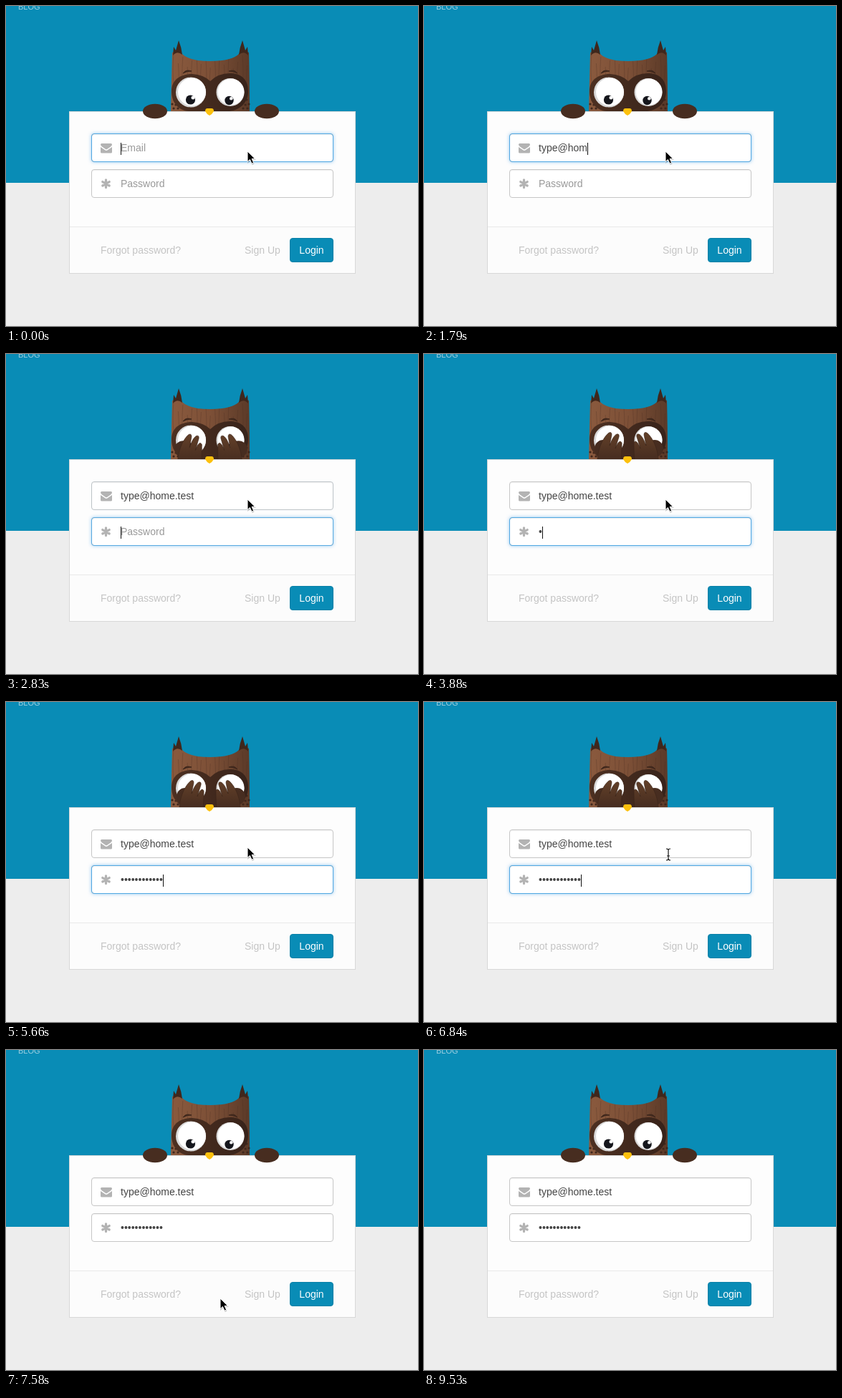
Animation of 575 by 447 pixels, one loop 9770 ms. Source, as an HTML page:

```html
<!DOCTYPE html>
<html lang="en">
<head>
<meta charset="utf-8">
<title>Owl login</title>
<style>
  html, body { margin: 0; width: 100%; height: 100%; overflow: hidden; background: #ededed; }
  body { position: relative; font: 14px/16px "Liberation Sans", Arial, sans-serif; color: #444; }
  div, span.at, svg { position: absolute; box-sizing: border-box; white-space: pre; }
  svg { left: 0; top: 0; }
  .sky { left: 0; top: 0; width: 575px; height: 247px; background: #098cb6; }
  .blog { left: 17px; top: -7px; font-size: 11px; color: #9fcfe0; }
  .card { left: 88px; top: 147px; width: 400px; height: 227px; background: #fdfdfd; border: 1px solid #d8d8d8; }
  .rule { left: 0; top: 160px; width: 398px; height: 65px; border-top: 1px solid #e9e9e9; background: #fcfcfc; }
  .field { left: 119px; width: 338px; height: 40px; padding: 11px 0 0 40px; border: 1px solid #c6c6c6;
    border-radius: 4px; background: #fff; box-shadow: inset 0 1px 1px rgba(0,0,0,.06); }
  .glow { inset: -1px; border: 1px solid #52a8e2; border-radius: 4px; box-shadow: 0 0 5px rgba(82,168,236,.6); }
  .caret { display: inline-block; width: 1px; height: 17px; margin: -2px -1px -2px 0; vertical-align: -3px; background: #111; }
  .hint { color: #999; }
  .link { color: #c4c4c4; }
  .btn { left: 396px; top: 324px; width: 61px; height: 34px; border: 1px solid #087fa6; border-radius: 4px;
    background: #098cb6; color: #fff; text-align: center; line-height: 32px; }
</style>
</head>
<body>
<div class="sky"></div>
<div class="blog">BLOG</div>
<div class="card"><div class="rule"></div></div>
<div class="field" id="mail" style="top:178px"><div class="glow"></div><span class="val"></span><i class="caret"></i><span class="hint">Email</span></div>
<div class="field" id="pass" style="top:228px"><div class="glow"></div><span class="val"></span><i class="caret"></i><span class="hint">Password</span></div>
<span class="at link" style="left:132px;top:333px">Forgot password?</span>
<span class="at link" style="left:333px;top:333px">Sign Up</span>
<div class="btn">Login</div>

<svg width="575" height="447" viewBox="0 0 575 447">
  <defs>
    <linearGradient id="fur">
      <stop offset="0" stop-color="#8a5a3e"/><stop offset=".5" stop-color="#7d5037"/><stop offset="1" stop-color="#5b3a28"/>
    </linearGradient>
    <linearGradient id="mask">
      <stop offset="0" stop-color="#4d3021"/><stop offset="1" stop-color="#38231a"/>
    </linearGradient>
    <linearGradient id="wing" x2="0" y2="1">
      <stop offset="0" stop-color="#634029"/><stop offset=".6" stop-color="#472d20"/>
    </linearGradient>
    <clipPath id="above"><rect x="170" y="40" width="230" height="107"/></clipPath>
    <clipPath id="body"><path id="shape" d="M232 65 Q239 62 245 66 Q255 77 285 77 Q316 77 326 66 Q333 62 339 65 Q340 100 340 148 H230 Q231 100 232 65Z"/></clipPath>
    <clipPath id="slot"><rect x="177" y="106" width="211" height="41"/></clipPath>
    <path id="arm" d="M4 65 L5 40 C6 25 14 9 21 4 Q25 2 25 7 L22 22 C25 13 29 7 32 6 Q36 5 35 10 L30 26 C32 20 35 16 37 16 Q40 17 39 21 C39 34 38 48 36 65Z"/>
  </defs>

  <g clip-path="url(#above)">
    <use href="#shape" fill="url(#fur)"/>
    <g clip-path="url(#body)">
      <path id="grain" fill="none" stroke="#4a2e20" stroke-opacity=".28"/>
    </g>
    <g fill="#3f271c">
      <path d="M233 69 L234 57 L237 62 L241 48 Q245 58 246 68 Q239 62 233 69Z"/>
      <path d="M338 69 L337 57 L334 62 L330 48 Q326 58 325 68 Q332 62 338 69Z"/>
      <path d="M247 94 Q251 88 259 91 Q252 91 247 94Z M323 94 Q319 88 311 91 Q318 91 323 94Z" stroke="#3f271c"/>
      <g id="freckles"></g>
    </g>
    <path fill="url(#mask)" d="M231 119 C231 103 243 95 260 95 Q276 96 285 105 Q296 94 312 94 C330 94 338 104 338 119 C338 136 326 145 312 147 H255 C240 146 231 134 231 119Z"/>
    <circle cx="258" cy="120.5" r="21" fill="#d9d9d9"/><circle cx="259.5" cy="120" r="19.5" fill="#fff"/>
    <circle cx="313" cy="120.5" r="19.5" fill="#d9d9d9"/><circle cx="314" cy="120" r="18.4" fill="#fff"/>
    <g fill="#15161c"><circle cx="257.5" cy="131" r="6.6"/><circle cx="311.5" cy="132" r="6.2"/></g>
    <g fill="#fff"><circle cx="261" cy="128" r="2.5"/><circle cx="314.3" cy="129.2" r="2.3"/></g>
  </g>

  <g fill="#472d20"><ellipse class="hand"/><ellipse class="hand"/></g>
  <g clip-path="url(#slot)" fill="url(#wing)" stroke="#3a2419" stroke-width=".6">
    <use class="arm" href="#arm"/><use class="arm" href="#arm"/>
  </g>
  <path d="M278 147 Q278 143 281 143 H287 Q290 143 290 147 Q288 151 284 153 Q280 151 278 147Z" fill="#fcc00d"/>

  <g fill="#b3b3b3">
    <path d="M132 193.5 Q132 192 133.5 192 H146.5 Q148 192 148 193.5 Q148 195 146 196.5 L141 200 Q140 200.6 139 200 L134 196.5 Q132 195 132 193.5Z"/>
    <path d="M132 197 L138.6 201.5 Q140 202.3 141.4 201.5 L148 197 V204 Q148 205.5 146.5 205.5 H133.5 Q132 205.5 132 204Z"/>
  </g>
  <path d="M139.5 243 V253.6 M134.8 245.6 L144.2 251 M144.2 245.6 L134.8 251" stroke="#b3b3b3" stroke-width="3.3" stroke-linecap="round"/>

  <g id="arrow">
    <path d="M0 1 V17 L4 13.2 L6.6 19 L9.4 17.8 L7 12 H12Z" fill="#000" opacity=".2"/>
    <path d="M0 0 V14.6 L3.4 11.4 L6 17.2 L8.6 16 L6.1 10.4 H10.6Z" fill="#000" stroke="#fff" stroke-width="1"/>
  </g>
  <g id="beam" fill="none">
    <path id="bar" d="M-3 -8 Q0 -8 0 -6 Q0 -8 3 -8 M0 -6 V6 M-3 8 Q0 8 0 6 Q0 8 3 8 M-2 2 H2" stroke="#fff" stroke-width="2.6"/>
    <use href="#bar" style="stroke:#111"/>
    <path d="M-3 -8 Q0 -8 0 -6 Q0 -8 3 -8 M0 -6 V6 M-3 8 Q0 8 0 6 Q0 8 3 8 M-2 2 H2" stroke="#111" stroke-width="1.2"/>
  </g>
</svg>

<script>
const LOOP = 9770, ADDRESS = 'type@home.test';
const $ = s => document.querySelector(s), $$ = s => [...document.querySelectorAll(s)];

// Each run [from, to, values] spreads its values evenly over the span.
const track = (first, ...runs) => [[0, first], ...runs.flatMap(([from, to, vals]) =>
  vals.map((v, i) => [from + (to - from) * i / Math.max(1, vals.length - 1), v]))];
const at = (keys, t) => keys.reduce((v, k) => k[0] <= t + .5 ? k[1] : v, keys[0][1]);

const typed = track(0, [450, 900, [1, 2, 4, 5]], [1200, 1200, [7]], [1790, 2534, [8, 9, 10, 11, 12, 14]]);
const dots = track(0, [3880, 4180, [1, 2, 3]], [4480, 4480, [4]], [4780, 5070, [5, 6, 8]], [5370, 5660, [9, 11, 12]]);
const focus = track('mail', [2680, 2680, ['pass']], [3280, 3280, ['']], [3880, 3880, ['pass']], [7280, 7280, ['']]);
// x, y, shape: 0 arrow, 1 text beam, 2 hidden
const pointer = track([337, 203, 0],
  [6110, 7140, [[341, 197, 1], [350, 181, 1], [356, 168, 0], [352, 182, 1], [341, 213, 1], [327, 247, 1], [312, 300, 0], [299, 347, 0]]],
  [9080, 9530, [[330, 337, 0], [432, 376, 0], [537, 429, 0], [0, 0, 2]]]);
const ticks = track(0, [2680, 2980, [2680, 2830, 2980]], [7280, 7580, [7280, 7430, 7580]]);

// CSS "ease" curve, solved by bisection
function ease(x) {
  if (x <= 0 || x >= 1) return x <= 0 ? 0 : 1;
  let lo = 0, hi = 1, s = .5;
  for (let i = 0; i < 20; i++) {
    s = (lo + hi) / 2;
    const bx = 3 * s * (1 - s) ** 2 * .25 + 3 * s * s * (1 - s) * .25 + s ** 3;
    if (bx < x) lo = s; else hi = s;
  }
  return 3 * s * (1 - s) ** 2 * .1 + 3 * s * s * (1 - s) + s ** 3;
}

let grain = '';
for (let i = 0; i < 17; i++) {
  const x = 234 + i * 6.4, y = 66 + (i * 37 % 23);
  grain += `M${x} ${y} q${i % 2 ? 2 : -2} 25 0 ${42 + i * 13 % 30}`;
}
$('#grain').setAttribute('d', grain);

$('#freckles').innerHTML = [[235, 131], [232, 137], [237, 138], [234, 143], [240, 143]].map(([x, y]) =>
  `<circle cx="${x}" cy="${y}" r="1.6"/><circle cx="${571 - x}" cy="${y}" r="1.6"/>`).join('');

const hands = $$('.hand'), arms = $$('.arm');

function poseOwl(p) {
  const q = 1 - p, size = 17 * (1 - .3 * p);
  hands.forEach((el, i) => {
    const side = i ? -1 : 1;
    el.setAttribute('cx', (i ? 364 : 208) + side * 42 * p);
    el.setAttribute('cy', 147 - 15 * p);
    el.setAttribute('rx', size);
    el.setAttribute('ry', 17 * (.6 + .1 * p));
  });
  arms.forEach((el, i) => {
    const mirror = i ? 'translate(569 0) scale(-1 1) ' : '';
    el.setAttribute('transform', `${mirror}translate(${237 - 40 * q} ${106 + 42 * q}) rotate(${-20 * q} 20 32.5)`);
    el.style.display = p ? '' : 'none';
  });
}

function setField(id, text, caret, glow) {
  const box = $('#' + id);
  box.querySelector('.val').textContent = text;
  box.querySelector('.hint').style.display = text ? 'none' : '';
  box.querySelector('.caret').style.visibility = caret ? 'visible' : 'hidden';
  box.querySelector('.glow').style.opacity = glow;
}

function draw(t) {
  const tick = at(ticks, t);
  const cover = tick < 7000 ? ease((tick - 2622) / 300) : 1 - ease((tick - 7240) / 300);
  const active = at(focus, t);
  poseOwl(cover);
  setField('mail', ADDRESS.slice(0, at(typed, t)), active === 'mail', tick < 7000 ? 1 - cover : 0);
  setField('pass', '•'.repeat(at(dots, t)), active === 'pass', cover);

  const [x, y, shape] = at(pointer, t);
  ['#arrow', '#beam'].forEach((id, i) => {
    const el = $(id);
    el.style.display = shape === i ? '' : 'none';
    el.setAttribute('transform', `translate(${x} ${y})`);
  });
}

const start = performance.now();
function loop() {
  draw((performance.now() - start) % LOOP);
  requestAnimationFrame(loop);
}
loop();
</script>
</body>
</html>
```
